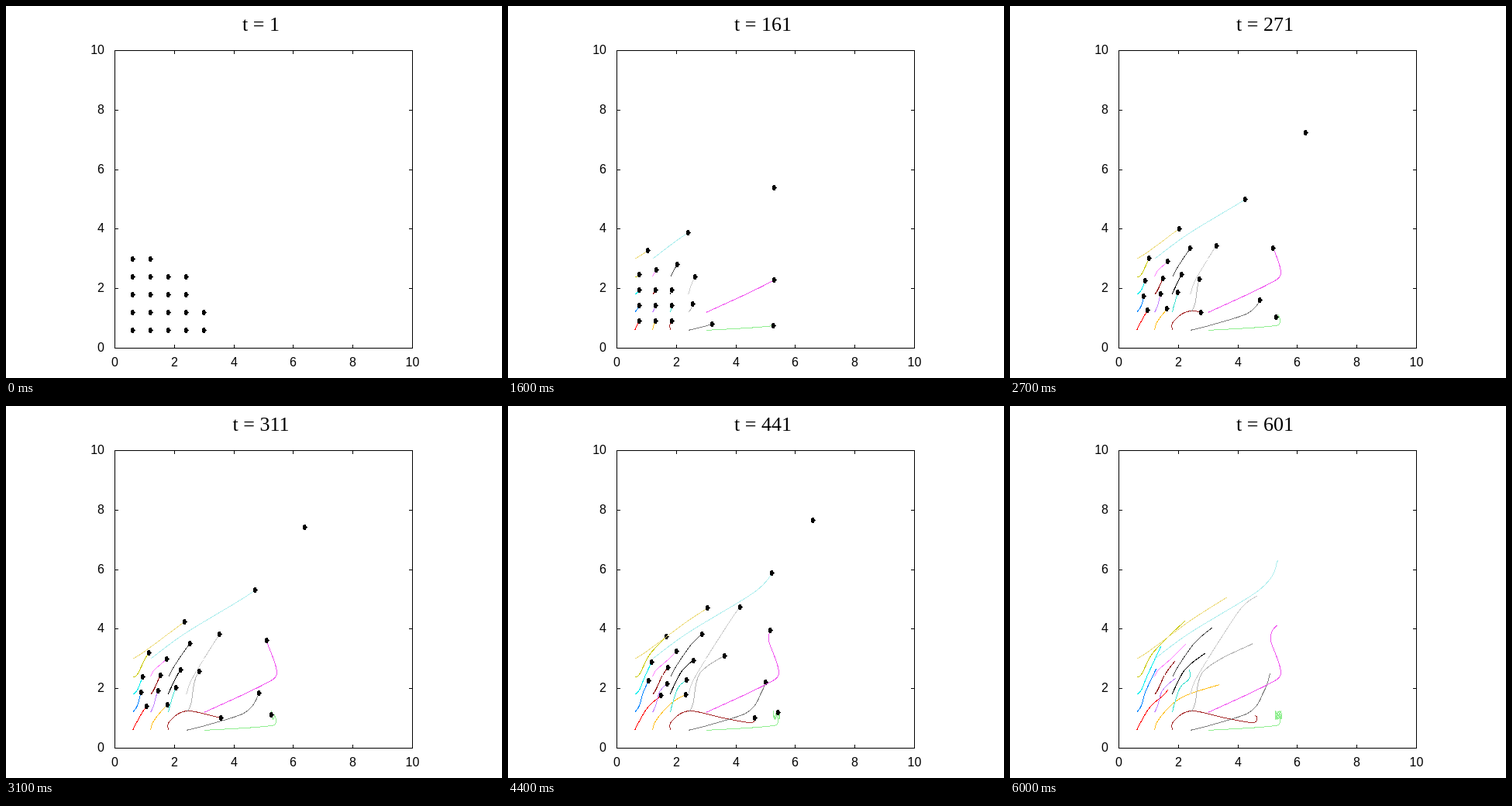
Write an HTML page that moves like this. It is 640 px wide and 480 px high and loops after 6.1 s.

```html
<!DOCTYPE html>
<html lang="en">
<head>
<meta charset="utf-8">
<title>Particle paths</title>
<style>
html, body { margin: 0; width: 100%; height: 100%; overflow: hidden; background: #fff; }
svg { display: block; width: 640px; height: 480px; }
.label { font: 16px "Liberation Sans", Arial, sans-serif; }
#title { font: 26px "Liberation Serif", "Times New Roman", serif; text-anchor: middle; }
.line { fill: none; stroke-width: 1; shape-rendering: crispEdges; }
.dot { shape-rendering: crispEdges; }
</style>
</head>
<body>
<svg viewBox="0 0 640 480">
  <text id="title" x="329" y="32">t = 1</text>
  <g id="paths"></g>
  <g id="axes"></g>
</svg>
<script>
const LOOP = 6100, STEP = 100, LAST = 60, FINE = 4;
const DOT = "M-1-3h3v1h0v1h1v1h1v1h-1v1h-1v2h-3v-1h-1v-5h1z";
const $ = id => document.getElementById(id);
const tracks = [];

const px = v => 140 + 38.4 * v;
const py = v => 441 - 38.4 * v;

function add(parent, tag, attrs, text) {
  const el = document.createElementNS("http://www.w3.org/2000/svg", tag);
  for (const k in attrs) el.setAttribute(k, attrs[k]);
  if (text !== undefined) el.textContent = text;
  return parent.appendChild(el);
}

function drawAxes() {
  const g = $("axes");
  let d = "M140.5 57.5h384v384h-384z";
  for (let v = 0; v <= 10; v += 2) {
    const x = Math.round(px(v)), y = Math.round(py(v));
    add(g, "text", { class: "label", x: 127, y: y + 5, "text-anchor": "end" }, v);
    add(g, "text", { class: "label", x: x + 0.5, y: 465, "text-anchor": "middle" }, v);
    if (v % 10) {
      d += `M${x + 0.5} 57v5M${x + 0.5} 442v-5`;
      d += `M140 ${y + 0.5}h5M525 ${y + 0.5}h-5`;
    }
  }
  add(g, "path", { class: "line", stroke: "#000", d });
}

// Smooth curve in time through the keys [t, x, y], slower at both ends.
function slope(keys, i, c) {
  const a = keys[i - 1] || keys[i], b = keys[i + 1] || keys[i];
  const ease = keys[i - 1] && keys[i + 1] ? 1 : 0.5;
  return ease * (b[c] - a[c]) / (b[0] - a[0]);
}

function at(keys, t) {
  let i = 0;
  while (i < keys.length - 2 && t > keys[i + 1][0]) i++;
  const p = keys[i], q = keys[i + 1], h = q[0] - p[0], u = (t - p[0]) / h;
  const w = u * u * (3 - 2 * u);
  return [1, 2].map(c =>
    p[c] + (q[c] - p[c]) * w
    + h * u * (1 - u) * ((1 - u) * slope(keys, i, c) - u * slope(keys, i + 1, c)));
}

// A particle starts at its grid cell and passes the given keys.
function track(col, row, color, keys, drift = () => [0, 0]) {
  const all = [[0, px(0.6 * col), py(0.6 * row)], ...keys];
  const pts = [];
  for (let i = 0; i <= LAST * FINE; i++) {
    const t = i / FINE, [x, y] = at(all, t), [dx, dy] = drift(t);
    pts.push([(x + dx + 0.5).toFixed(2), (y + dy + 0.5).toFixed(2)]);
  }
  const line = add($("paths"), "polyline", { class: "line", stroke: color });
  const dot = add($("paths"), "path", { class: "dot", d: DOT });
  tracks.push({ pts, line, dot });
}

// Inside the block the first push weakens with column and row.
function inner(col, row, color, ...keys) {
  const push = [16, px(0.6 * col) + 8 - 2 * col, py(0.6 * row) - 15 + 3 * row];
  track(col, row, color, [push, ...keys]);
}

// Small loops once the particle is caught.
function trapped(t) {
  const s = Math.max(0, t - 24);
  return [-4 * Math.sin(0.28 * s), 5 * Math.sin(0.9 * s)];
}

// Drawing order matters: later trails cross earlier dots.
inner(1, 1, "#ff0000", [31, 181, 387], [44, 197, 373], [60, 203, 366]);
inner(1, 2, "#0080ff", [31, 174, 369], [60, 188, 339]);
inner(1, 3, "#00eeee", [31, 176, 349], [60, 194, 310]);
inner(1, 4, "#c8c800", [31, 184, 318], [60, 225, 277]);
inner(2, 1, "#ffc020", [31, 208, 385], [44, 229, 372], [60, 270, 359]);
inner(2, 2, "#c080ff", [31, 196, 367], [60, 214, 350]);
inner(2, 3, "#8b0000", [31, 199, 347], [60, 212, 329]);
track(2, 4, "#ff80ff", [[16, 191, 340], [31, 207, 326], [60, 226, 307]]);
inner(3, 1, "#a52a2a", [25, 234, 393], [31, 277, 402], [37, 312, 408], [44, 318, 402], [60, 316, 399]);
inner(3, 2, "#40e0d0", [31, 219, 363], [46, 231, 351], [60, 231, 339]);
inner(3, 3, "#000000", [31, 225, 340], [60, 252, 318]);
track(3, 4, "#4d4d4d", [[16, 218, 333], [31, 237, 306], [60, 261, 285]]);
track(4, 1, "#7f7f7f", [[16, 263, 410], [22, 308, 395], [31, 326, 370], [60, 335, 345]]);
track(4, 2, "#b3b3b3", [[16, 238, 384], [31, 249, 342], [60, 313, 306]]);
track(4, 3, "#cccccc", [[16, 241, 349], [31, 275, 294], [44, 299, 259], [60, 319, 244]]);
track(4, 4, "#ffffff", [[16, 343, 234], [22, 370, 181], [31, 385, 156], [60, 399, 143]]);
track(5, 1, "#90ee90", [[16, 342, 412], [20, 348, 406], [24, 346, 399], [60, 346, 399]], trapped);
track(5, 2, "#f055f0", [[16, 343, 353], [19, 349, 342], [31, 336, 302], [60, 344, 282]]);
track(1, 5, "#eedd82", [[16, 180, 315], [31, 230, 278], [60, 280, 246]]);
track(2, 5, "#afeeee", [[16, 232, 292], [31, 321, 237], [60, 345, 199]]);

let shown = -1;

function draw(ms) {
  const n = Math.floor((ms % LOOP) / STEP);
  if (n === shown) return;
  shown = n;
  $("title").textContent = `t = ${n * 10 + 1}`;
  for (const { pts, line, dot } of tracks) {
    const [x, y] = pts[n * FINE];
    line.setAttribute("points", n ? pts.slice(0, n * FINE + 1).join(" ") : "");
    dot.setAttribute("transform", `translate(${Math.floor(x)} ${Math.floor(y)})`);
    dot.setAttribute("visibility", n === LAST ? "hidden" : "visible");
  }
}

function tick() {
  draw(performance.now());
  requestAnimationFrame(tick);
}

drawAxes();
tick();
</script>
</body>
</html>
```
